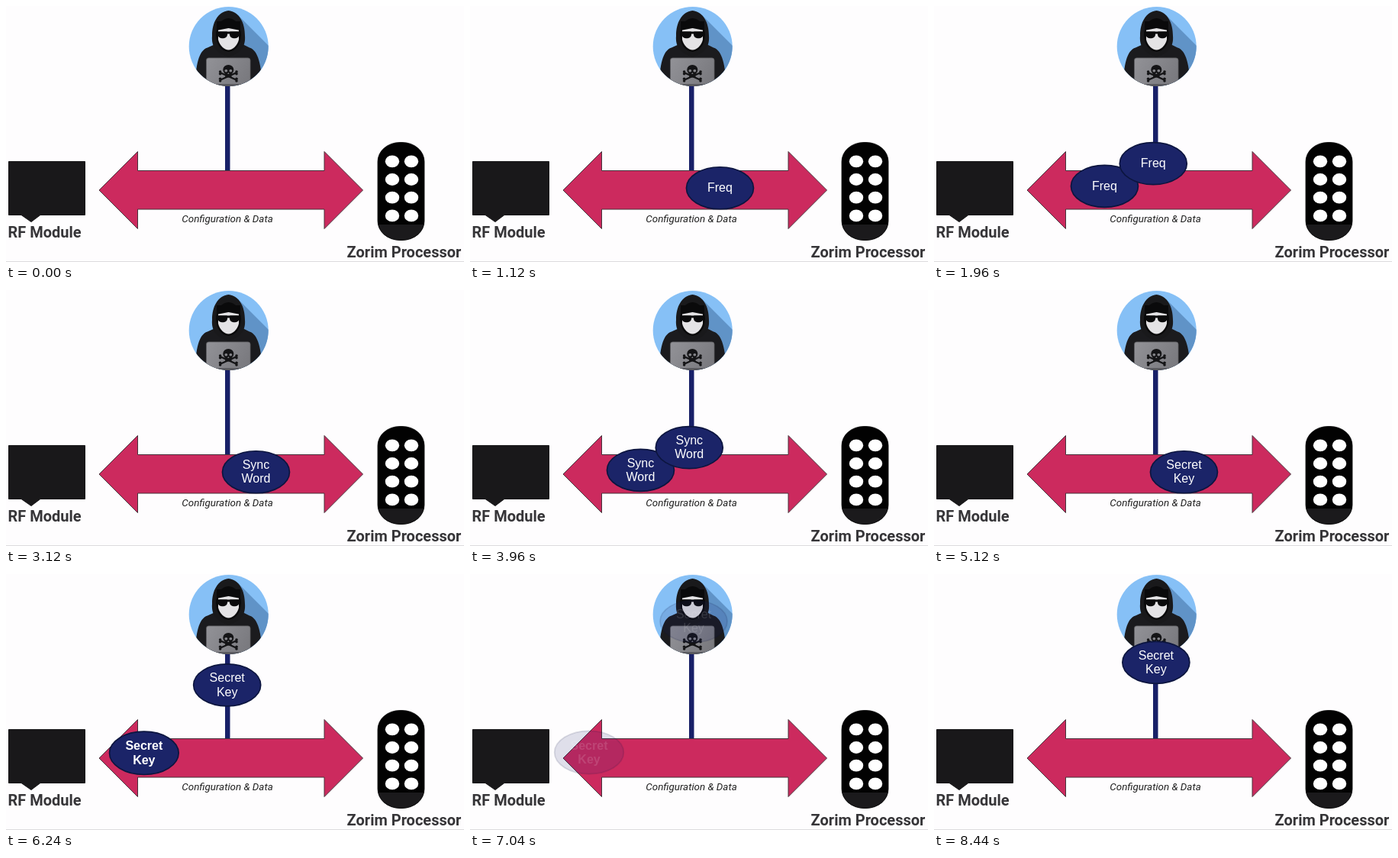
These frames come from a looping animation (600x335 px, 8480 ms). An HTML page with a canvas:

```html
<!DOCTYPE html>
<html lang="en">
<head>
<meta charset="utf-8">
<title>Bus sniffing</title>
<style>
html, body { margin: 0; width: 100%; height: 100%; overflow: hidden; background: #fefdfe; }
canvas { display: block; width: 600px; height: 335px; }
</style>
</head>
<body>
<canvas id="stage" width="600" height="335"></canvas>
<script>
const ctx = document.getElementById('stage').getContext('2d');
const LOOP = 8480, STEP = 40, CYCLE = 2000;
const NAVY = '#1b2468', EDGE = '#0c153f', INK = '#19181a';
const PACKETS = [['Freq'], ['Sync', 'Word'], ['Secret', 'Key']];

// Key places of a packet's route
const ENTRY = [375, 238.5], TAP = [286, 238], MODULE = [156, 233.5], THIEF = [293, 62];

const ease = (t, start, length) => {
  const p = Math.min(1, Math.max(0, (t - start) / length));
  return (1 - Math.cos(Math.PI * p)) / 2;
};
const mix = (a, b, p) => a.map((v, i) => v + (b[i] - v) * p);

function shape(fill, draw, stroke, width = 1) {
  ctx.beginPath();
  draw();
  if (fill) { ctx.fillStyle = fill; ctx.fill(); }
  if (stroke) { ctx.strokeStyle = stroke; ctx.lineWidth = width; ctx.stroke(); }
}

function poly(fill, points, stroke, width) {
  shape(fill, () => {
    points.forEach(([x, y]) => ctx.lineTo(x, y));
    ctx.closePath();
  }, stroke, width);
}

function oval(fill, x, y, rx, ry, stroke, width) {
  shape(fill, () => ctx.ellipse(x, y, rx, ry, 0, 0, Math.PI * 2), stroke, width);
}

function text(str, x, y, font, color) {
  ctx.font = font;
  ctx.fillStyle = color;
  ctx.textAlign = 'center';
  ctx.textBaseline = 'alphabetic';
  ctx.fillText(str, x, y);
}

function skull(x, y) {
  const bone = '#141416';
  for (const side of [-1, 1]) {
    shape(null, () => {
      ctx.moveTo(x - side * 10, y + 3.5);
      ctx.lineTo(x + side * 10, y + 12.5);
    }, bone, 2.4);
    for (const dy of [2, 4.8, 11.2, 14]) oval(bone, x + side * 10.7, y + dy, 1.8, 1.8);
  }
  oval(bone, x, y - 0.5, 7, 6.6);
  ctx.fillRect(x - 4.2, y + 3, 8.4, 6.5);
  for (const side of [-1, 1]) oval('#85858a', x + side * 3, y + 0.8, 1.9, 1.8);
  poly('#85858a', [[x, y + 3], [x + 1.2, y + 5], [x - 1.2, y + 5]]);
}

function hacker() {
  ctx.save();
  shape('#86c0f6', () => ctx.arc(291.7, 53, 52, 0, Math.PI * 2));
  ctx.clip();
  poly('#6093c7', [[304, 12], [350, 58], [350, 110], [300, 110], [296, 40]]);

  // Shoulders and arms
  shape('#1b1b1e', () => {
    ctx.moveTo(248, 108);
    ctx.bezierCurveTo(248, 80, 252, 58, 264, 54.5);
    ctx.lineTo(274, 50);
    ctx.lineTo(310, 50);
    ctx.lineTo(319, 54.5);
    ctx.bezierCurveTo(331, 58, 335, 80, 336, 108);
  });
  // Hood
  shape('#19191b', () => {
    ctx.moveTo(291.5, 6);
    ctx.bezierCurveTo(306, 8, 313, 22, 313, 39);
    ctx.bezierCurveTo(314, 52, 309, 61, 291.5, 67);
    ctx.bezierCurveTo(274, 61, 269, 52, 270, 39);
    ctx.bezierCurveTo(270, 22, 277, 8, 291.5, 6);
  });
  oval('#0a0a0b', 291.5, 38, 16.5, 22);
  // Face and glasses
  shape('#e4e3e5', () => {
    ctx.moveTo(278, 31);
    ctx.quadraticCurveTo(291.5, 25, 305, 31);
    ctx.lineTo(305, 44);
    ctx.bezierCurveTo(303, 52, 297, 57.5, 291.5, 57.5);
    ctx.bezierCurveTo(286, 57.5, 280, 52, 278, 44);
    ctx.closePath();
  });
  poly('#0a0a0b', [[276, 20], [307, 20], [307, 32], [291.5, 29], [276, 32]]);
  ctx.fillRect(276.5, 33.5, 30, 3);
  for (const x of [277.5, 293]) {
    shape('#0a0a0b', () => ctx.roundRect(x, 33.5, 12.5, 8.8, [1, 1, 5, 5]));
  }
  // Laptop
  const metal = ctx.createLinearGradient(263, 68, 320, 103);
  metal.addColorStop(0, '#929297');
  metal.addColorStop(1, '#77777c');
  shape(metal, () => ctx.roundRect(262.5, 68, 57.5, 35, 3), '#606064', 0.8);
  skull(291.3, 84);
  ctx.fillStyle = '#5b5b60';
  ctx.fillRect(258, 102, 67, 4);
  ctx.restore();
}

function keypad() {
  const body = () => ctx.roundRect(487, 178.5, 61, 128, { x: 29, y: 25 });
  ctx.save();
  shape('#020202', body);
  ctx.clip();
  ctx.fillStyle = '#1b1a1c';
  ctx.fillRect(487, 286, 61, 22);
  ctx.restore();
  shape(null, body, '#050505', 0.8);
  for (const x of [506, 531]) {
    for (let i = 0; i < 4; i++) oval('#fff', x, 203.3 + i * 23.7, 9.2, 7.9);
  }
}

function scene() {
  ctx.fillStyle = '#fefdfe';
  ctx.fillRect(0, 0, 600, 335);
  ctx.fillStyle = '#dcdbdd';
  ctx.fillRect(0, 334, 600, 1);

  ctx.fillStyle = '#182068';
  ctx.fillRect(287, 100, 6.5, 115);

  poly('#cc2a5e', [
    [122, 241], [172.5, 190.5], [172.5, 215.5], [417, 215.5], [417, 190.5],
    [467.5, 241], [417, 291.5], [417, 266], [172.5, 266], [172.5, 291.5]
  ], '#46323b', 1);

  poly(INK, [[3.5, 203.5], [103.5, 203.5], [103.5, 273.5], [45, 273.5],
    [33, 282.5], [20, 273.5], [3.5, 273.5]], INK, 1);
  keypad();

  text('RF Module', 50.5, 302.7, 'bold 20px Roboto, sans-serif', '#363538');
  text('Zorim Processor', 521.5, 328.7, 'bold 20px Roboto, sans-serif', '#363538');
  text('Configuration & Data', 290, 283, 'italic 13.4px Roboto, sans-serif', '#202020');
  hacker();
}

function packet(lines, [x, y], alpha = 1, bold = false) {
  ctx.globalAlpha = alpha;
  const grow = bold ? 1.3 : 0;
  oval(NAVY, x, y, 44 + grow, 27.5 + grow / 2, EDGE, 1.7);
  const font = (bold ? 'bold ' : '') + '16px "Liberation Sans", Arial, sans-serif';
  lines.forEach((line, i) => {
    text(line, x, y + 5.1 + (i - (lines.length - 1) / 2) * 18.2, font, '#fff');
  });
  ctx.globalAlpha = 1;
}

// u is the time within one packet's own trip
function trip(lines, u, bold) {
  if (u < 640 || u >= 3080) return;
  const alpha = 1 - Math.max(0, (u - 2780) / 300);
  if (u >= 1480) packet(lines, mix(TAP, MODULE, ease(u, 1350, 1250)), alpha, bold);
  const at = u < 1600
    ? mix(ENTRY, TAP, ease(u, 640, 920))
    : mix(TAP, THIEF, ease(u, 1630, 1180));
  packet(lines, at, alpha);
}

function draw(t) {
  scene();
  PACKETS.forEach((lines, i) => trip(lines, t - i * CYCLE, i === 2));
  if (t >= 8000) {
    packet(PACKETS[2], mix(THIEF, TAP, ease(t, 8000, 1180)), Math.min(1, (t - 8000) / 160));
  }
}

const begin = performance.now();
function tick() {
  const t = (performance.now() - begin) % LOOP;
  draw(Math.floor(t / STEP) * STEP);
  requestAnimationFrame(tick);
}
tick();
</script>
</body>
</html>
```
